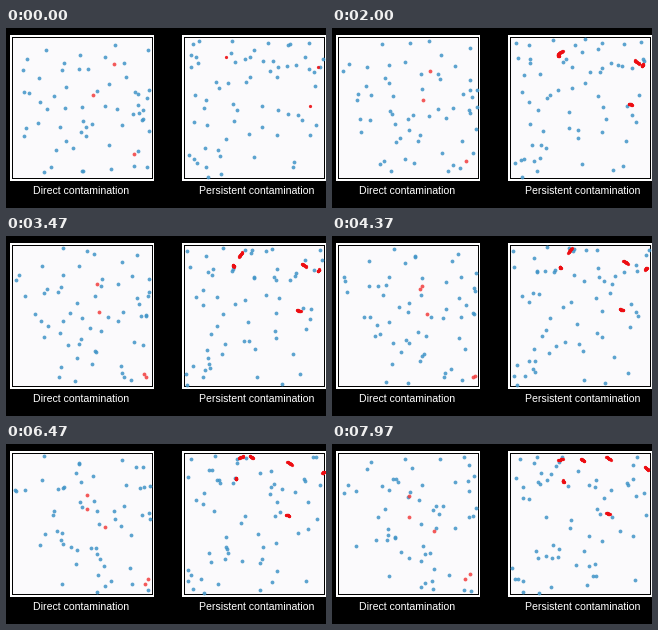
Write a matplotlib script that moves like this. It is 320 px wide and 180 px high and loops after 8 s.

```python
import numpy as np
import matplotlib.pyplot as plt
from matplotlib.animation import FuncAnimation
from matplotlib.patches import Rectangle

W, H, DPI = 320, 180, 100
STEP = 50            # ms
FRAMES = 160
TRAIL = 0.95         # seconds a contaminated spot stays
PANEL_GAP = 172      # distance between the two boxes
BLUE = (0.25, 0.58, 0.78, 0.85)
RED = (0.95, 0.24, 0.24, 0.85)
TRAIL_RED = (0.93, 0.05, 0.07, 0.9)

# carriers: moment of infection, then (time, x, y) at start and collisions
left_carriers = [
    (0, [(0, 108, 36), (3.47, 90.5, 48.5), (8, 76.5, 73)]),
    (0, [(0, 87, 67), (8, 102, 87)]),
    (0, [(0, 128, 126), (5.3, 144, 144), (8, 133, 135)]),
    (3.4, [(0, 143, 103), (3.4, 140, 141), (5.3, 145, 138), (8, 137.5, 130)]),
    (3.5, [(0, 82, 41), (3.5, 95, 50), (5.3, 85, 51), (8, 76.5, 52)]),
]
right_carriers = [
    (0, [(0, 220, 29), (2, 231, 23), (4.7, 241, 10.5), (8, 252.5, 17)]),
    (1.1, [(0, 225, 25), (8, 231.7, 38)]),
    (4.7, [(0, 257, 33), (4.7, 241, 11), (8, 226, 16.5)]),
    (0, [(0, 312, 39), (8, 274, 12.5)]),
    (.6, [(0, 308, 44), (.6, 309, 39), (6.5, 318, 27.5), (8, 313, 23)]),
    (0, [(0, 304, 78), (8, 274, 69)]),
]


class Crowd:
    """Healthy walkers drifting in straight lines and bouncing off the walls."""

    def __init__(self, count, shift, seed):
        rng = np.random.default_rng(seed)
        self.lo = np.array([8 + shift, 11])
        self.span = np.array([137, 138])
        self.start = rng.uniform(0, 1, (count, 2)) * self.span
        speed, angle = rng.uniform(1, 7.5, count), rng.uniform(0, 2 * np.pi, count)
        self.velocity = np.column_stack([np.cos(angle), np.sin(angle)]) * speed[:, None]

    def at(self, t):
        path = self.start + self.velocity * t
        return self.lo + self.span - np.abs(path % (2 * self.span) - self.span)


def along(path, t):
    ts, xs, ys = zip(*path)
    return np.interp(t, ts, xs), np.interp(t, ts, ys)


fig = plt.figure(figsize=(W / DPI, H / DPI), dpi=DPI, facecolor="black")
ax = fig.add_axes([0, 0, 1, 1])
ax.set_xlim(0, W)
ax.set_ylim(H, 0)
ax.axis("off")


def box(x0, y0, x1, y1, color):
    ax.add_patch(Rectangle((x0, y0), x1 - x0, y1 - y0, fc=color, ec="none",
                           antialiased=False))


def panel(shift, label, text_x):
    box(4 + shift, 7, 148 + shift, 153, "white")
    box(6 + shift, 9, 147 + shift, 151, "black")
    box(7 + shift, 10, 146 + shift, 150, "#fbfafc")
    ax.text(text_x, 166.3, label, color="white", family="Liberation Sans",
            size=10.53 * 72 / DPI, va="baseline")


def dots(color, size, z):
    return ax.scatter([], [], s=size, color=[color], linewidths=0, zorder=z)


panel(0, "Direct contamination", 27.3)
panel(PANEL_GAP, "Persistent contamination", 193.3)
crowds = [Crowd(57, 0, 4), Crowd(62, PANEL_GAP, 11)]
healthy, sick, spots = dots(BLUE, 7.6, 3), dots(RED, 7.6, 4), dots(TRAIL_RED, 5.4, 5)
ages = np.linspace(0, TRAIL, 11)


def draw(i):
    t = i * STEP / 1000
    waiting = [along(path, t) for t0, path in left_carriers + right_carriers
               if t < t0]
    red = [along(path, t) for t0, path in left_carriers if t >= t0]
    trail = [along(path, t - a) for t0, path in right_carriers
             for a in ages if t - a >= t0]
    healthy.set_offsets(np.vstack([c.at(t) for c in crowds]
                                  + [np.reshape(waiting, (-1, 2))]))
    sick.set_offsets(red)
    spots.set_offsets(trail)
    return healthy, sick, spots


anim = FuncAnimation(fig, draw, frames=FRAMES, interval=STEP, repeat=True,
                     repeat_delay=0, init_func=lambda: draw(0))
plt.show()
```
